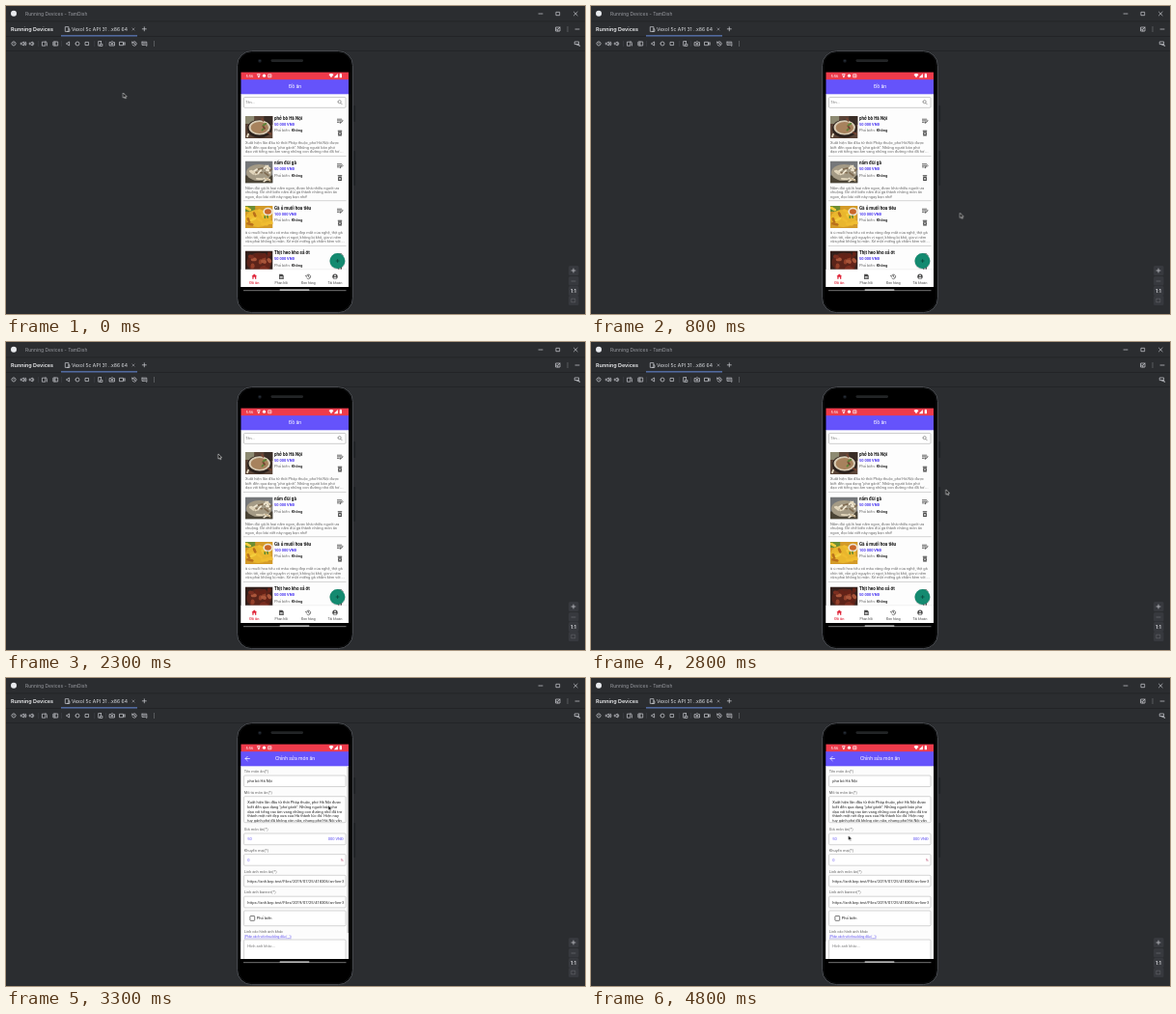
An HTML page for the animation above (5000 ms loop, 600 px wide and 319 px high).

```html
<!DOCTYPE html>
<html lang="vi">
<head>
<meta charset="utf-8">
<title>Running Devices</title>
<style>
html, body { margin: 0; width: 100%; height: 100%; overflow: hidden; background: #2b2d30; }
#stage { display: block; width: 100vw; height: 100vh; }
text { font-family: Roboto, Arial, sans-serif; white-space: pre; }
.ide text { font-family: Inter, Roboto, sans-serif; }
.line { fill: none; stroke-width: .7; stroke-linecap: round; stroke-linejoin: round; }
.ide .line { stroke: #ced0d6; }
.form, .bar, .percent, .cursor { animation: 5s infinite step-end; }
.form { animation-name: open; }
.bar { animation-name: scrollbar; }
.percent { animation-name: tint; }
.cursor { animation-name: move; }

@keyframes open { 0% { opacity: 0 } 58%, 100% { opacity: 1 } }
@keyframes scrollbar { 0% { opacity: 0 } 62% { opacity: 1 } 82%, 100% { opacity: 0 } }
@keyframes tint { 0% { fill: #5b4df0 } 62%, 100% { fill: #b8446a } }
@keyframes move {
  0%   { transform: translate(121.4px, 90px); animation-timing-function: steps(5, end) }
  10%  { transform: translate(342px, 261px) }
  12%  { transform: translate(345px, 263px); animation-timing-function: steps(3, end) }
  18%  { transform: translate(401px, 190px); animation-timing-function: steps(3, end) }
  24%  { transform: translate(178.2px, 115.5px) }
  44%  { transform: translate(178.2px, 115.5px); animation-timing-function: steps(4, end) }
  52%  { transform: translate(345px, 117px); animation-timing-function: steps(2, end) }
  56%  { transform: translate(367.8px, 152.8px); animation-timing-function: steps(2, end) }
  60%  { transform: translate(366.6px, 143px); animation-timing-function: steps(3, end) }
  66%  { transform: translate(334px, 131.8px) }
  74%  { transform: translate(334px, 131.8px); animation-timing-function: steps(2, end) }
  78%  { transform: translate(290px, 150px) }
  80%  { transform: translate(290px, 150px); animation-timing-function: steps(3, end) }
  86%, 100% { transform: translate(266.6px, 163px) }
}
</style>
</head>
<body>
<svg id="stage" viewBox="0 0 600 319"></svg>
<script>
// y is the middle of the x-height line, not the baseline
const text = (x, y, size, str, fill, more = '') =>
  `<text x="${x}" y="${y + size * .35}" font-size="${size}" fill="${fill}" ${more}>${str}</text>`;
const rect = (x, y, w, h, fill, more = '') =>
  `<rect x="${x}" y="${y}" width="${w}" height="${h}" fill="${fill}" ${more}/>`;
const dot = (x, y, r, fill, more = '') =>
  `<circle cx="${x}" cy="${y}" r="${r}" fill="${fill}" ${more}/>`;
// stroke icon drawn around its own centre
const icon = (x, y, d, more = '') =>
  `<path class="line" transform="translate(${x} ${y})" d="${d}" ${more}/>`;
const BOLD = 'font-weight="700"', MID = 'text-anchor="middle"', END = 'text-anchor="end"';

let seed = 7;
const rnd = () => (seed = seed * 16807 % 2147483647) / 2147483647;

const SQUARE = 'M-2-2H2V2H-2Z', CROSS = 'M-1.8-1.8L1.8 1.8M1.8-1.8L-1.8 1.8',
  PLUS = 'M-2 0H2M0-2V2', RING = 'M-2 0A2 2 0 1 1 2 0A2 2 0 1 1-2 0',
  DOTS = 'M0-2V-2M0 0V0M0 2V2', PHONE = 'M-1.6-2.4H1.6V2.4H-1.6Z',
  SPEAKER = 'M-2.4-.8H-1.2L.3-2V2L-1.2.8H-2.4Z', MINUS = 'M-2 0H2';

function ide() {
  const tools = [
    [8, 'M0-2.6V-.2M-1.4-1.7A2.1 2.1 0 1 0 1.4-1.7'],
    [18, SPEAKER + 'M1.5-1.2Q2.4 0 1.5 1.2M2.4-1.9Q3.8 0 2.4 1.9'],
    [27, SPEAKER + 'M1.5-1.2Q2.4 0 1.5 1.2'],
    [40, 'M-2.2-1.8H.8V2.2H-2.2ZM1-2.4Q2.4-2 2.4-.4V2'],
    [51.5, 'M-2.2-2H2.2V2H-2.2ZM-.6-2V2M-2.4 0H-1'],
    [64, 'M1.3-1.8L-1.6 0L1.3 1.8Z'], [74, RING], [84, 'M-1.6-1.6H1.6V1.6H-1.6Z'],
    [97.5, 'M1-2.4H-1.8V2.2H-.2M1-2.4V-.6M.4.4H2.4V2.4H.4Z'],
    [110, 'M-2.5-1.4H-1.2L-.6-2.2H.6L1.2-1.4H2.5V2H-2.5ZM-.9.2A.9.9 0 1 1 .9.2A.9.9 0 1 1-.9.2'],
    [120.5, 'M-2.6-1.7H1V1.7H-2.6ZM1-.3L2.7-1.4V1.4L1 .3'],
    [133, 'M-2-1A2.2 2.2 0 1 1-2 1M-2.3-2V-.8H-1M0-1V.2L1 .8'],
    [143.5, 'M-2.5-1.8H2.3V.2M-2.5-1.8V1.4H0M-1.4-.2H1M1 1.4L2.4 2.4V.8'],
    [153.5, DOTS],
    [592, 'M-2.4-2H1.6V.6H-2.4ZM-1 .8L2.4 2.2M1 .4L2.4 2.2']
  ].map(([x, d]) => icon(x, 39, d)).join('');
  const gaps = [33, 57.5, 91, 103].map(x => rect(x, 36, .5, 6, '#43454a')).join('');
  const zoom = [274, 285, 295, 305].map(y =>
    rect(583, y - 5, 10.5, y > 284 && y < 290 ? 9.5 : 10, '#37393e', 'rx="1.5"')).join('');
  return `<g class="ide">
    ${rect(0, 0, 600, 319, '#2b2d30')}
    ${[15.6, 31, 46].map(y => rect(0, y, 600, .6, '#1e1f22')).join('')}
    ${dot(8, 7.8, 3, '#e9ebee')}
    ${text(20, 7.8, 4.95, 'Running Devices - TamDish', '#9a9ca2')}
    ${icon(554, 8, MINUS)}${icon(572, 8, 'M-1.7-1.7H1.7V1.7H-1.7Z')}${icon(590.3, 8, CROSS)}
    ${text(5, 23.8, 5.45, 'Running Devices', '#f0f1f3', 'font-weight="600"')}
    ${rect(57, 30.2, 79, 1.3, '#5d79b8')}
    ${icon(63.3, 24, PHONE + 'M0 2.4H2.6V-.2H1.6')}
    ${text(68, 23.8, 5.1, 'Vexol 5c API 31 ..x86 64', '#dfe1e5')}
    ${icon(132, 24, 'M-1.1-1.1L1.1 1.1M1.1-1.1L-1.1 1.1', 'opacity=".6"')}
    ${icon(143.3, 23.8, PLUS)}
    ${icon(572, 24, SQUARE + 'M0 0L2-2M-.2 2V.2H-2')}${icon(582, 24, DOTS)}${icon(592, 24, MINUS)}
    ${gaps}${tools}${zoom}
    ${icon(588, 274, PLUS)}${icon(588, 285, MINUS, 'opacity=".35"')}
    ${text(588, 295, 4.4, '1:1', '#dfe1e5', MID + BOLD)}
    ${icon(588, 305, 'M-1.8-1.8H1.8V1.8H-1.8Z', 'opacity=".25"')}
  </g>`;
}

function phone() {
  return rect(360, 103, 2.2, 17, '#222427', 'rx="1"') + rect(360, 150, 2.2, 36, '#222427', 'rx="1"') +
    rect(239.6, 46.6, 119.8, 271, '#050505', 'rx="15" stroke="#4a4d52" stroke-width="1"') +
    rect(241, 48, 117, 268.2, '#000', 'rx="13.5" stroke="#17181a" stroke-width=".6"') +
    rect(274.5, 55.3, 33.5, 2.6, '#222426', 'rx="1.3"') +
    dot(263, 56.8, 1.9, '#15181d') + dot(263, 56.8, .8, '#2d3846') +
    rect(283.5, 293.4, 31, 1.3, '#f4f4f4', 'rx=".65"');
}

function header(title) {
  return rect(243.5, 76, 111.5, 15.3, '#6553fb') + text(299.5, 83.6, 5.1, title, '#fff', MID);
}

function status() {
  return rect(243.5, 68.6, 111.5, 7.6, '#ee3b4b') +
    text(248.5, 72.3, 4.1, '5:56', '#fff') +
    icon(262, 72.2, 'M-1.2-1.6H1.2L0 1.6ZM0 0V.6', 'stroke="#fff"') +
    dot(267.5, 72.2, 1.6, '#fff') +
    icon(273.5, 72.2, 'M-1.4-1.4H1.4V1.6H-1.4ZM-.4 0H.4', 'stroke="#fff"') +
    `<path d="M334.5 71Q337 69 339.5 71L337 74.3ZM343.9 70V74.3H339.8Z" fill="#fff"/>` +
    rect(345.7, 70.2, 2.3, 4.1, '#fff', 'rx=".4"') + rect(346.3, 69.7, 1.1, .6, '#fff');
}

const pick = list => list[Math.floor(rnd() * list.length)];
const strokes = (n, colors, len, width) => Array.from({ length: n }, () => {
  const x = 3 + rnd() * 22, y = 4 + rnd() * 16, a = rnd() * 6.3;
  return `<path d="M${x} ${y}l${len * Math.cos(a)} ${len * .6 * Math.sin(a)}" stroke="${pick(colors)}" stroke-width="${width}" stroke-linecap="round"/>`;
}).join('');
const oval = (x, y, rx, ry, fill) => `<ellipse cx="${x}" cy="${y}" rx="${rx}" ry="${ry}" fill="${fill}"/>`;
const photos = [
  () => rect(0, 0, 28, 23, '#5a4437') + rect(0, 0, 9, 8, '#8d8a72') + rect(19, 0, 9, 9, '#392d26') +
    oval(14.5, 13, 12.5, 9.5, '#2b211c') + oval(14.5, 11.8, 11, 7.6, '#d8cbb4') +
    oval(14.5, 12, 9, 6, '#a7825d') + strokes(6, ['#e6dcc4', '#744432', '#5d8238'], 4, 1.8),
  () => rect(0, 0, 28, 23, '#75777a') + rect(0, 15, 28, 8, '#4b4436') + oval(14, 12, 13, 8.5, '#a49a85') +
    strokes(17, ['#e3d7bd', '#f0e7d2', '#806c52', '#c9b592'], 6, 1.7),
  () => rect(0, 0, 28, 23, '#d39a28') + rect(0, 0, 10, 6, '#6d8d32') + oval(13, 13, 13, 9, '#e9b62d') +
    strokes(14, ['#f3cd3c', '#d88a17', '#b9701a', '#f0bd30'], 5, 2.6) +
    oval(23, 6, 5, 4.2, '#ebe5d5') + oval(23, 6, 3.4, 2.7, '#c9672a') + strokes(2, ['#56852f'], 3, 1.5),
  () => rect(0, 0, 28, 23, '#33201c') + oval(14, 12, 12.5, 10, '#5b241a') +
    strokes(18, ['#7b2e20', '#94402a', '#662217', '#a9553a'], 2.5, 3.6)
];

const dishes = [
  ['phở bò Hà Nội', '50 000',
    'Xuất hiện lần đầu từ thời Pháp thuộc, phở Hà Nội được',
    'biết đến qua dạng "phở gánh". Những người bán phở',
    'dạo với tiếng rao âm vang những con đường nhỏ đã hở ...'],
  ['nấm đùi gà', '50 000',
    'Nấm đùi gà là loại nấm ngon, được khá nhiều người ưa',
    'chuộng. Để chế biến nấm đùi gà thành những món ăn',
    'ngon, đọc bài viết này ngay bạn nhé!'],
  ['Gà ủ muối hoa tiêu', '100 000',
    'à ủ muối hoa tiêu có màu vàng đẹp mắt của nghệ, thịt gà',
    'chín tới, vẫn giữ nguyên vị ngọt, không bị khô, gia vị nêm',
    'vừa phải không bị mặn. Xé một miếng gà chấm kèm với ...'],
  ['Thịt heo kho sả ớt', '50 000']
];

function dish([name, price, ...lines], i) {
  const y = 114 + i * 46.5;
  return `<svg x="248" y="${y}" width="28.5" height="23" viewBox="0 0 28.5 23"><g transform="scale(1.02 1)">${photos[i]()}</g></svg>` +
    text(278, y + 2.2, 4.55, name, '#111', BOLD) +
    text(278, y + 8.4, 3.9, price + ' VNĐ', '#4a36f2', BOLD) +
    text(278, y + 14.6, 4.05, 'Phổ biến: <tspan fill="#111" font-weight="500">Không</tspan>', '#666') +
    icon(346, y + 5, 'M-2.6-1.8H1.6M-2.6-.2H.6M-2.6 1.4H-.8M.2 2L.5.9L2.4-.9L3.1-.2L1.2 1.7Z', 'stroke="#333"') +
    `<path d="M343.8 ${y + 14.8}h4.4v1h-4.4zM344.1 ${y + 16.3}h3.8v4.1h-3.8z" fill="#444"/>` +
    icon(346, y + 18.4, 'M-.8-.9L.8.8M.8-.9L-.8.8', 'stroke="#fff"') +
    lines.map((s, n) => text(248, y + 27.9 + n * 4.55, 4.02, s, '#666')).join('') +
    rect(246, y + 41, 106.5, .6, '#bbb');
}

function list() {
  const tabs = [
    [257.3, 'Đồ ăn', 'M-2.8-.2L0-2.8L2.8-.2H2V2.4H.7V.5H-.7V2.4H-2V-.2Z'],
    [285.3, 'Phản hồi', 'M-2.2-2.6H1L2.4-1.2V2.6H-2.2Z'],
    [313.3, 'Đơn hàng', ''],
    [341, 'Tài khoản', RING.replaceAll('2', '2.7') + 'Z']
  ].map(([x, label, d], i) => {
    const c = i ? '#4a4a4a' : '#e0283c';
    return `<path transform="translate(${x} 280.3)" d="${d}" fill="${c}"/>` +
      text(x, 286.9, i ? 3.45 : 3.9, label, c, MID + (i ? '' : ' font-weight="500"'));
  }).join('');
  return `<g>${rect(243.5, 91, 111.5, 200, '#fdfdfd')}${header('Đồ ăn')}
    ${rect(246.5, 94.5, 105.5, 10.8, '#fff', 'rx="1" stroke="#999" stroke-width=".5"')}
    ${text(248.3, 99.8, 3.9, 'Tên...', '#777')}
    ${icon(346, 99.6, 'M-2-.4A1.6 1.6 0 1 1 1.2-.4A1.6 1.6 0 1 1-2-.4M.8.8L2.3 2.3', 'stroke="#777"')}
    ${dishes.map(dish).join('')}
    ${dot(343.5, 264.8, 8.2, '#000', 'opacity=".18"')}${dot(343.4, 264, 7.9, '#148a70')}
    ${icon(343.6, 264, 'M-1.5 0H1.5M0-1.5V1.5', 'stroke="#0b4439"')}
    ${rect(243.5, 273, 111.5, 18, '#fff')}${rect(243.5, 272.7, 111.5, .4, '#ddd')}${tabs}
    ${icon(285.3, 280.5, 'M-1 0H1M-1 1.3H1', 'stroke="#fff"')}
    ${icon(313.3, 280.3, 'M-2-1A2.3 2.3 0 1 1-1.4 1.8M-2.9-1L-2 .1L-.9-.9M.2-1.2V.2L1.2.8', 'stroke="#4a4a4a"')}
    ${dot(341, 279.3, .9, '#fff')}${oval(341, 281.8, 1.5, .8, '#fff')}
  </g>`;
}

function form() {
  const box = (y, h) => rect(246.6, y, 105.4, h, '#fff', 'rx="1" stroke="#aaa" stroke-width=".5"');
  const label = (y, s) => text(246.8, y, 4, s, '#666');
  const value = (y, s, fill = '#222') => text(250.3, y, 4.02, s, fill);
  const about = [...dishes[0].slice(2, 4),
    'dạo với tiếng rao âm vang những con đường nhỏ đã trở',
    'thành một nét đẹp xưa của Hà thành lúc đó. Hiện nay',
    'tuy gánh phở đã không còn nữa, nhưng phở Hà Nội vẫn'];
  const url = 'https://anh.bep.test/Files/2019/07/25/418306/an-lien-3';
  return `<g class="form">
    <clipPath id="fields">${rect(247, 91, 103.3, 58.4, '#000')}${rect(247, 150, 103.3, 141, '#000')}</clipPath>
    <clipPath id="page">${rect(243.5, 76, 111.5, 215, '#000')}</clipPath>
    <g clip-path="url(#page)">
    ${rect(243.5, 91, 111.5, 200, '#fcfcfc')}${header('Chỉnh sửa món ăn')}
    ${icon(250.2, 83.5, 'M2.2 0H-2.2M0-2.2L-2.2 0L0 2.2', 'stroke="#fff"')}
    ${label(97, 'Tên món ăn(*)')}${box(101, 11.5)}
    ${label(118.8, 'Mô tả món ăn(*)')}${box(122.7, 27)}
    ${label(156.8, 'Giá món ăn(*)')}${box(161, 11.7)}
    ${label(178.4, 'Khuyến mại(*)')}${box(182.6, 11.6)}
    ${label(200.2, 'Link ảnh món ăn(*)')}${box(204.3, 11.7)}
    ${label(222, 'Link ảnh banner(*)')}${box(226.2, 11.7)}
    ${box(241, 15.7)}${label(262.4, 'Link các hình ảnh khác')}
    ${text(246.8, 267.7, 3.2, '(Phân cách với nhau bằng dấu ( , ))', '#5b4df0', 'text-decoration="underline"')}
    ${box(271, 24)}
    <g clip-path="url(#fields)">
      ${value(106.9, dishes[0][0])}
      ${about.map((s, i) => value(128.6 + i * 4.75, s)).join('')}
      ${value(166.9, '50', '#6a5cf5')}${text(349.6, 166.9, 4.02, '000 VNĐ', '#5b4df0', END)}
      ${value(188.4, '0', '#6a5cf5')}${text(349.6, 188.4, 4.02, '%', '#5b4df0', END + 'class="percent"')}
      ${value(210.3, url)}${value(232.2, url)}
      ${value(277.3, 'Hình ảnh khác...', '#777')}
    </g>
    ${rect(252.9, 246.5, 4.8, 4.8, '#fff', 'rx=".6" stroke="#444" stroke-width=".7"')}
    ${text(259.8, 249, 4.05, 'Phổ biến', '#222')}
    ${rect(353.7, 92, 1, 172, '#9a9a9a', 'class="bar"')}
    </g></g>`;
}

const cursor = `<g class="cursor"><path d="M0 0V5.2L1.2 4.1L2 5.9L2.9 5.5L2.1 3.8H3.7Z"
  fill="#000" stroke="#fff" stroke-width=".55" stroke-linejoin="round"/></g>`;

document.getElementById('stage').innerHTML = ide() + phone() + list() + form() + status() + cursor;
</script>
</body>
</html>
```
